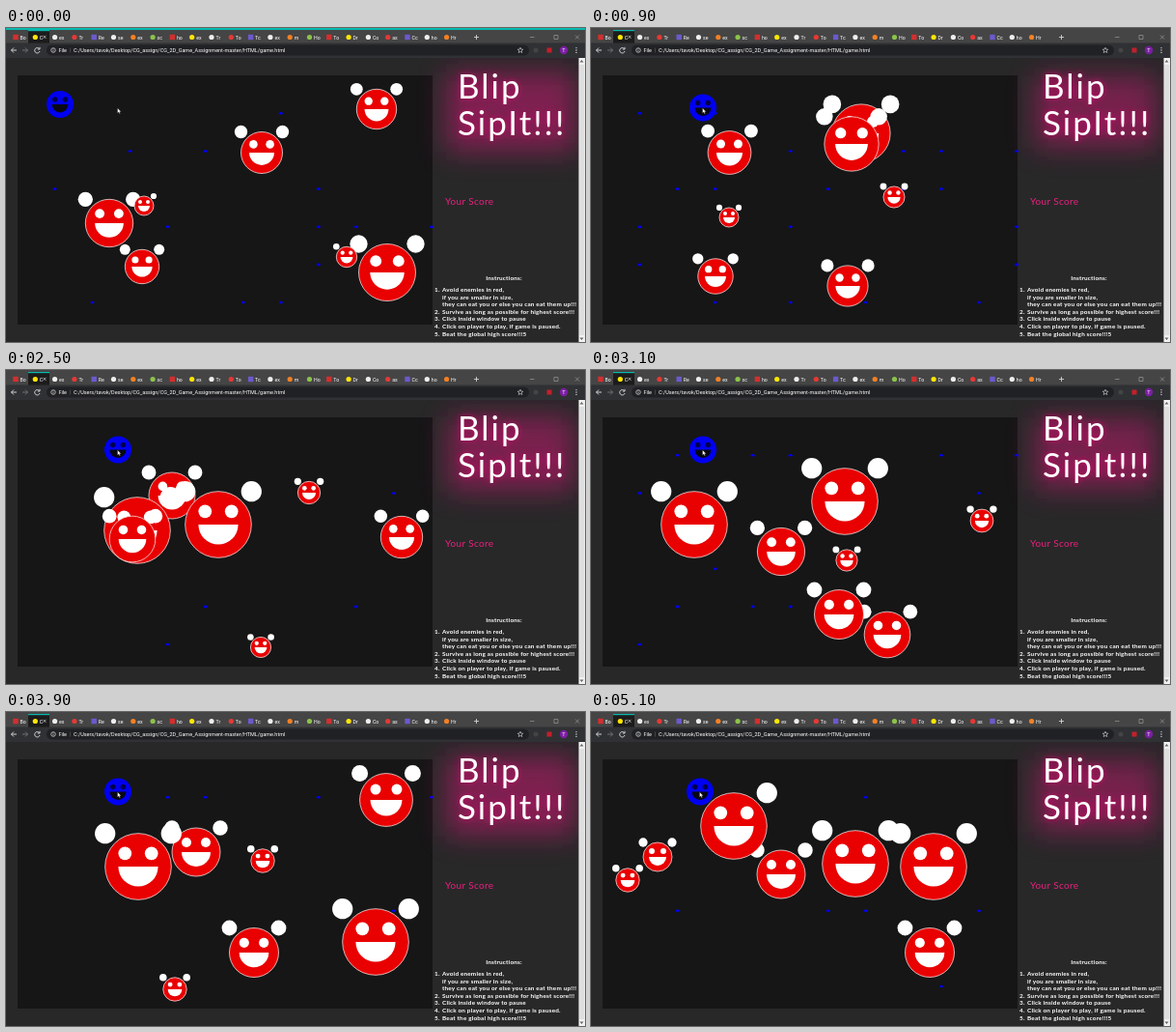
An HTML page for the animation above (5.2 s loop, 600 by 325 pixels).

```html
<!DOCTYPE html>
<html lang="en">
<head>
<meta charset="utf-8">
<title>Game</title>
<style>
  html, body { margin: 0; width: 100%; height: 100%; overflow: hidden; background: #282828; }
  svg { display: block; width: 600px; height: 325px; }
  text { font-family: Lato, "Open Sans", sans-serif; fill: #fff; }
  .ui { font-family: Roboto, Arial, sans-serif; }
  .title { font-size: 35px; letter-spacing: 2px; }
</style>
</head>
<body>
<svg id="stage" viewBox="0 0 600 325" xmlns="http://www.w3.org/2000/svg">
  <defs>
    <filter id="wide" x="-40%" y="-60%" width="180%" height="220%"><feGaussianBlur stdDeviation="14"/></filter>
    <filter id="near" x="-20%" y="-40%" width="140%" height="180%"><feGaussianBlur stdDeviation="3"/></filter>
    <g id="enemy">
      <circle cx="-1" cy="-1" r=".31" fill="#fff"/>
      <circle cx="1" cy="-1" r=".31" fill="#fff"/>
      <circle r="1" fill="#e90000" stroke="#f4dcdc" stroke-width=".8" vector-effect="non-scaling-stroke"/>
      <circle cx="-.4" cy="-.4" r=".2" fill="#fff"/>
      <circle cx=".4" cy="-.4" r=".2" fill="#fff"/>
      <path d="M-.6 0A.6 .6 0 0 0 .6 0Z" fill="#fff"/>
    </g>
    <clipPath id="field"><rect x="12" y="49" width="430" height="258"/></clipPath>
    <clipPath id="page"><rect y="31" width="593" height="294"/></clipPath>
  </defs>

  <rect width="600" height="325" fill="#282828"/>

  <g id="chrome">
    <rect width="600" height="16" fill="#454545"/>
    <rect id="accent" width="600" height="2" fill="#08b9ad"/>
    <path d="M23 16V3H45V16Z" fill="#1c1c1c"/>
    <rect x="23" y="2" width="22" height="1.2" fill="#08b9ad"/>
    <rect y="15.5" width="600" height="15.5" fill="#303134"/>
    <rect x="42" y="17.5" width="500" height="11" rx="5.5" fill="#202124"/>
    <g fill="none" stroke="#e0e0e0" stroke-width=".9">
      <path d="M11 23H5.5M8 20.5L5.5 23L8 25.5"/>
      <path d="M17 23H22.5M20 20.5L22.5 23L20 25.5" stroke="#777"/>
      <path d="M40.4 21.4A2.7 2.7 0 1 0 41 24M41 19.8V22H38.8" transform="translate(-6)"/>
      <circle cx="49" cy="23" r="2.3" stroke-width=".7"/>
      <path d="M49 22.6V24.3M49 21.3V22" stroke-width=".7"/>
      <path d="M66.5 20.5V25.5" stroke="#666" stroke-width=".5"/>
      <path d="M533 20.2l.8 1.9 2 .1-1.5 1.3.5 2-1.8-1.1-1.8 1.1.5-2-1.5-1.3 2-.1Z" stroke-width=".6"/>
      <path d="M38.5 7.8l3 3m0-3l-3 3" stroke-width=".7"/>
      <path d="M543 9.5h4.5M568 7.5h4v4h-4ZM590 7.5l4 4m0-4l-4 4" stroke="#999" stroke-width=".7"/>
      <path d="M485 9.5h5M487.5 7v5" stroke-width=".8"/>
    </g>
    <circle cx="549" cy="23" r="2.5" fill="#444"/>
    <rect x="560.5" y="20.5" width="5" height="5" fill="#c3202c"/>
    <circle cx="578" cy="23" r="4.2" fill="#7b1fa2"/>
    <text class="ui" x="578" y="25" font-size="5.5" text-anchor="middle">T</text>
    <g fill="#ddd"><circle cx="591" cy="20.6" r=".7"/><circle cx="591" cy="23" r=".7"/><circle cx="591" cy="25.4" r=".7"/></g>
    <text class="ui" x="54.5" y="25" font-size="5.4">File</text>
    <text class="ui" x="70" y="25" font-size="5.5">C:/Users/tavok/Desktop/CG_assign/CG_2D_Game_Assignment-master/HTML/game.html</text>
  </g>

  <rect x="593.5" y="31" width="6.5" height="294" fill="#f1f1f1"/>
  <rect x="594.2" y="38" width="5" height="280" fill="#dedede"/>
  <path d="M594.5 35.5l2-2.5 2 2.5ZM594.5 320.5l2 2.5 2-2.5Z" fill="#666"/>

  <rect x="12" y="49" width="430" height="258" fill="#161616"/>
  <g id="dots" fill="#0000ff"></g>
  <g clip-path="url(#field)">
    <g id="enemies"></g>
    <g id="player">
      <circle r="14" fill="#0000f2"/>
      <g fill="#00004c">
        <circle cx="-5.3" cy="-5" r="2.7"/><circle cx="5.3" cy="-5" r="2.7"/>
        <path d="M-8.4 0A8.4 8.4 0 0 0 8.4 0Z" fill="#080814"/>
      </g>
    </g>
  </g>
  <path id="cursor" d="M0 0V5.4L1.3 4.3L2.2 6.2L3 5.8L2.2 4H3.8Z" fill="#fff" stroke="#111" stroke-width=".4"/>

  <g clip-path="url(#page)">
    <rect id="halo" fill="#b01c68" filter="url(#wide)"/>
    <g id="titleGlow" class="title" filter="url(#near)">
      <text x="468" y="73" style="fill:#e60073">Blip</text>
      <text x="468" y="111" style="fill:#e60073">SipIt!!!</text>
    </g>
    <g class="title">
      <text x="468" y="73">Blip</text>
      <text x="468" y="111">SipIt!!!</text>
    </g>
  </g>
  <text x="455" y="183" font-size="10" letter-spacing=".35" style="fill:#ec2080">Your Score</text>
  <g id="help" font-size="6.4" font-weight="700" letter-spacing=".17">
    <text x="516" y="261" text-anchor="middle">Instructions:</text>
  </g>
</svg>
<script>
const LOOP = 5200, STEP = 100;
const $ = id => document.getElementById(id);
const add = (parent, tag, attrs, text) => {
  const el = document.createElementNS("http://www.w3.org/2000/svg", tag);
  for (const k in attrs) el.setAttribute(k, attrs[k]);
  if (text) el.textContent = text;
  parent.appendChild(el);
  return el;
};
const mix = (a, b, u) => a + (b - a) * u;
const clamp = u => Math.max(0, Math.min(1, u));

let seed = 11;
const rand = () => (seed = seed * 16807 % 2147483647) / 2147483647;

// Browser tabs
const icons = ["#d32f2f", "#ffe600", "#eee", "#e53935", "#6a5acd", "#eee", "#f48024", "#8bc34a"];
"Bo C ex Tr Re se ex sc ho ex Tr To Tc ex m Ho To Dr Co as Cc ho Hr".split(" ").forEach((label, i) => {
  const x = 10 + i * 20.3, fill = icons[i % icons.length];
  if (i % 4 === 0) add($("chrome"), "rect", { x: x - 2.7, y: 6.8, width: 5.4, height: 5.4, fill });
  else add($("chrome"), "circle", { cx: x, cy: 9.5, r: 2.6, fill });
  add($("chrome"), "text", { class: "ui", x: x + 4.5, y: 11.5, "font-size": 5.2 }, label);
});

// Instructions
["1.Avoid enemies in red,", "if you are smaller in size,",
 "they can eat you or else you can eat them up!!!",
 "2.Survive as long as possible for highest score!!!",
 "3.Click inside window to pause",
 "4.Click on player to play, if game is paused.",
 "5.Beat the global high score!!!5"].forEach((line, i) => {
  const y = 273.2 + i * 7.55, [, num, rest] = line.match(/^(\d\.)?(.*)$/);
  if (num) add($("help"), "text", { x: 444, y }, num);
  add($("help"), "text", { x: 452, y }, rest);
});

// Food comes and goes on a grid, each cell in its own rhythm
const dots = [];
for (let row = 0; row < 6; row++) for (let col = 0; col < 11; col++) {
  const el = add($("dots"), "ellipse", { cx: 50.5 + col * 39.05, cy: 88.3 + row * 39.15, rx: 2, ry: 1.3 });
  dots.push({ el, phase: rand(), period: mix(4000, 9000, rand()) });
}

// Enemies pass their key points at shared moments, first along x, then along y
const moments = [0, 900, 1700, 2500, 3100, 3900, 5100];
const enemies = [];
const enemy = (size, ...points) => enemies.push({ ...size, points, el: add($("enemies"), "use", { href: "#enemy" }) });
enemy({ small: 21.5, big: 25, full: 3500, pow: 1 },
  [265, 129], [143.5, 129], [61, 129], [172, 130], [197, 188], [197, 145], [197, 168]);
enemy({ small: 29.5, big: 34.3, full: 2500, pow: 2 },
  [395, 253], [280, 109], [367, 254], [220, 160], [263, 136], [383, 238], [355, 160]);
enemy({ small: 17.7, big: 34.3, full: 5100, pow: 2 },
  [141, 247], [129, 257], [263, 123], [410, 173], [307, 274], [394, 91], [274, 157]);
enemy({ small: 24.7, big: 34.3, full: 2500, pow: 1 },
  [107, 202], [270, 120], [128, 209], [136, 166], [107, 160], [137, 160], [148, 118]);
enemy({ small: 20.7, big: 25.5, full: 3100, pow: 2 },
  [384, 84], [266, 267], [115, 146], [131, 175], [257, 253], [257, 249], [351, 249]);
enemy({ small: 10, big: 15, full: 5100, pow: 3 },
  [143, 184], [143, 196], [81, 102], [264, 287], [265, 197], [266, 154], [69, 150]);
enemy({ small: 10.7, big: 12.2, full: 3900, pow: 1 },
  [353, 237], [314, 175], [314, 91], [314, 127], [405, 156], [175, 287], [38, 174]);

function place(points, t) {
  let i = 0;
  while (i < moments.length - 2 && t >= moments[i + 1]) i++;
  const [x0, y0] = points[i], [x1, y1] = points[i + 1];
  const dx = Math.abs(x1 - x0), dy = Math.abs(y1 - y0);
  const way = (t - moments[i]) / (moments[i + 1] - moments[i]) * (dx + dy);
  return [mix(x0, x1, dx && clamp(way / dx)), mix(y0, y1, dy && clamp((way - dx) / dy))];
}

function draw(t) {
  for (const { el, points, small, big, full, pow } of enemies) {
    const [x, y] = place(points, t), r = mix(small, big, clamp(t / full) ** pow);
    el.setAttribute("transform", `translate(${x} ${y}) scale(${r})`);
  }
  for (const { el, phase, period } of dots)
    el.setAttribute("visibility", (phase + t / period) % 1 < .2 ? "visible" : "hidden");

  const go = clamp(t / 500), drift = 3 * clamp((t - 4800) / 300);
  $("player").setAttribute("transform", `translate(${mix(56, 116, go) - drift} ${mix(79, 82.5, go)})`);
  $("cursor").setAttribute("transform", `translate(${115.5 - drift} 82.8)`);
  $("accent").setAttribute("visibility", t < 500 ? "visible" : "hidden");

  const glow = .5 + .5 * Math.cos(Math.PI * t / 1000), pad = 4 * glow, halo = $("halo");
  halo.setAttribute("x", 460 - pad);
  halo.setAttribute("y", 50 - pad);
  halo.setAttribute("width", 126 + 2 * pad);
  halo.setAttribute("height", 74 + 2 * pad);
  halo.setAttribute("opacity", .58 + .05 * glow);
  $("titleGlow").setAttribute("opacity", .95 - .2 * glow);
}

const start = performance.now();
function tick() {
  const t = (performance.now() - start) % LOOP;
  draw(Math.floor(t / STEP) * STEP);
  requestAnimationFrame(tick);
}
draw(0);
requestAnimationFrame(tick);
</script>
</body>
</html>
```
